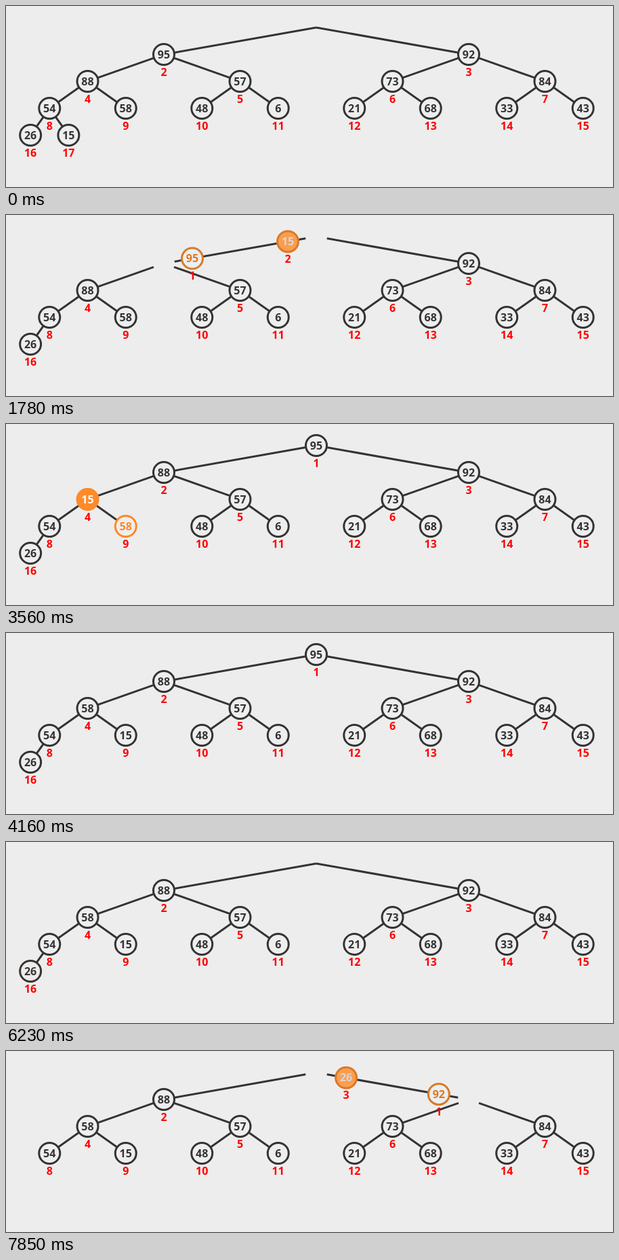
These frames come from a looping animation (896 px wide and 269 px high, 8 s). An HTML page:

```html
<!DOCTYPE html>
<html lang="en">
<head>
<meta charset="utf-8">
<title>Heap sort</title>
<style>
  html, body { margin: 0; width: 100%; height: 100%; overflow: hidden; background: #ededed; }
  svg { display: block; width: 896px; height: 269px; }
  text { font: bold 16px "Open Sans", "Noto Sans", sans-serif; text-anchor: middle; }
  line { stroke: #333; stroke-width: 3; }
  circle { stroke-width: 3; }
  #labels { fill: #f00; }
</style>
</head>
<body>
<svg viewBox="0 0 896 269">
  <g id="edges"></g>
  <g id="discs"></g>
  <g id="numbers"></g>
  <g id="labels"></g>
</svg>
<script>
const LOOP = 8000, STEP = 508, DUR = 500, GAP = 16;

// Each look holds fill, outline and number colour.
const PLAIN = [[238, 238, 238], [51, 51, 51], [51, 51, 51]].flat();
const LIT = [[255, 138, 39], [255, 138, 39], [255, 255, 255]].flat();
const SEEN = [[238, 238, 238], [255, 138, 39], [255, 138, 39]].flat();

const ease = p => p < 0.5 ? 4 * p ** 3 : 1 - 4 * (1 - p) ** 3;
const clamp = p => Math.max(0, Math.min(1, p));
const mix = (a, b, p) => a.map((v, i) => v + (b[i] - v) * p);

function add(tag, parent) {
  const el = document.createElementNS("http://www.w3.org/2000/svg", tag);
  document.getElementById(parent).append(el);
  return el;
}

function set(el, attrs) {
  for (const k in attrs) el.setAttribute(k, attrs[k]);
}

// A track is a start value plus eased changes, each lasting DUR.
function track(start) {
  const moves = [];
  return {
    to(t, value) { moves.push([t, value]); },
    at(t) {
      return moves.reduce((v, [t0, target]) =>
        t > t0 ? mix(v, target, ease(clamp((t - t0) / DUR))) : v, start);
    }
  };
}

// Centre of a slot in the binary tree, counted from 1.
function place(i) {
  const depth = Math.floor(Math.log2(i)), n = 2 ** depth;
  return [458 + 900 * ((i - n + 0.5) / n - 0.5), 32 + 40 * depth];
}

const values = [95, 92, 88, 57, 73, 84, 54, 58, 48, 6, 21, 68, 33, 43, 26, 15];
const slots = [];
const nodes = values.map((value, k) => {
  const slot = k + 2;
  const node = {
    slots: [[-1, slot]],
    pos: track(place(slot)),
    look: track(PLAIN),
    size: track([1]),
    disc: add("circle", "discs"),
    number: add("text", "numbers"),
    label: add("text", "labels")
  };
  node.number.textContent = value;
  slots[slot] = node;
  return node;
});

const rootGap = track([0]);
const edges = values.map((_, k) => ({
  child: k + 2,
  left: track([1]),
  gone: Infinity,
  el: add("line", "edges")
}));

function move(t, node, slot) {
  node.pos.to(t, place(slot));
  node.slots.push([t, slot]);
  slots[slot] = node;
}

// The last leaf is lit, then travels to the empty root.
function promote(t, slot) {
  const node = slots[slot], edge = edges[slot - 2];
  node.look.to(t, LIT);
  t += STEP;
  move(t, node, 1);
  rootGap.to(t, [1]);
  edge.left.to(t, [0]);
  edge.gone = t + DUR;
}

// Parent and larger child are lit, then trade places.
function sink(t, from, to) {
  const down = slots[from], up = slots[to];
  down.look.to(t, LIT);
  up.look.to(t, SEEN);
  t += STEP;
  move(t, down, to);
  move(t, up, from);
  down.look.to(t, PLAIN);
  up.look.to(t, PLAIN);
}

function takeRoot(t) {
  const node = slots[1];
  node.look.to(t, LIT);
  node.size.to(t + STEP, [0]);
  rootGap.to(t + STEP, [0]);
}

promote(76, 17);
sink(1092, 1, 2);
sink(2108, 2, 4);
sink(3124, 4, 9);
takeRoot(5127);
promote(6143, 16);
sink(7159, 1, 3);

function drawEdge(e, t) {
  const a = place(e.child >> 1), b = place(e.child);
  const len = Math.hypot(b[0] - a[0], b[1] - a[1]);
  const gap = e.child < 4 ? GAP * rootGap.at(t)[0] : GAP;
  const left = e.left.at(t)[0];
  const p = mix(a, b, gap / len * left);
  const q = mix(a, b, (1 - GAP / len) * left);
  set(e.el, {
    x1: p[0], y1: p[1], x2: q[0], y2: q[1],
    visibility: t < e.gone ? "visible" : "hidden"
  });
}

function drawNode(n, t) {
  const [x, y] = n.pos.at(t), look = n.look.at(t), [s] = n.size.at(t);
  const rgb = i => `rgb(${look.slice(i, i + 3).map(Math.round)})`;
  const visibility = s > 0.001 ? "visible" : "hidden";
  const font = `font-size:${16 * s}px`;
  set(n.disc, {
    cx: x, cy: y, r: 15.5 * s, fill: rgb(0), stroke: rgb(3),
    style: `stroke-width:${3 * s}px`, visibility
  });
  set(n.number, { x, y: y + 5.6 * s, fill: rgb(6), style: font, visibility });
  set(n.label, { x, y: y + 26 + 5.6 * s, style: font, visibility });
  const slot = n.slots.filter(([t0]) => t >= t0).pop()[1];
  if (n.label.textContent !== String(slot)) n.label.textContent = slot;
}

function draw(t) {
  edges.forEach(e => drawEdge(e, t));
  nodes.forEach(n => drawNode(n, t));
}

let begin;
function tick(now) {
  begin ??= now;
  draw((now - begin) % LOOP);
  requestAnimationFrame(tick);
}
draw(0);
requestAnimationFrame(tick);
</script>
</body>
</html>
```
